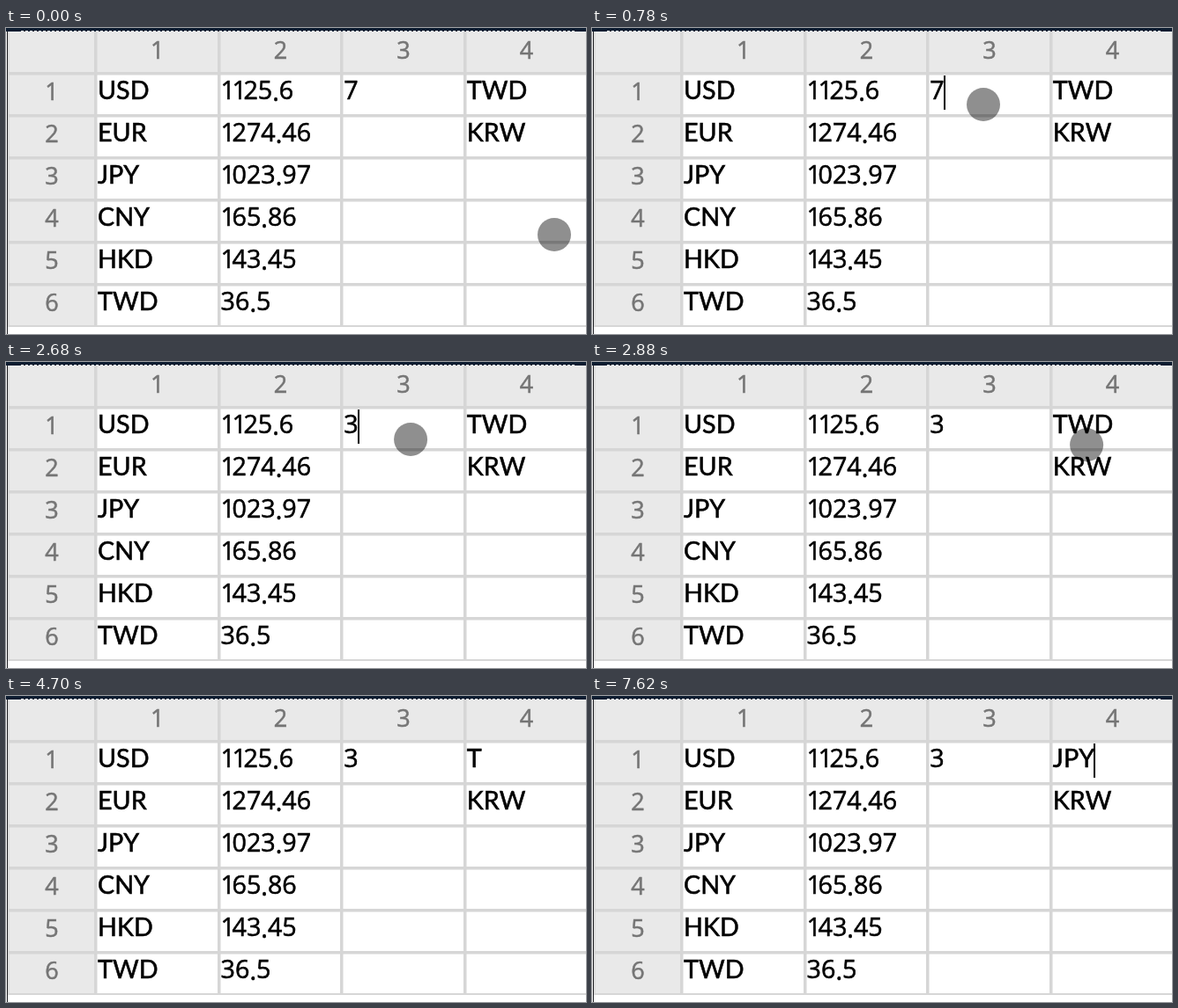
Animation of 658x348 px, one loop 8 s. Source, as an HTML page:

```html
<!DOCTYPE html>
<html lang="en">
<head>
<meta charset="utf-8">
<title>Exchange sheet</title>
<style>
  html, body { margin: 0; width: 100%; height: 100%; overflow: hidden; background: #fff; }
  svg { display: block; width: 658px; height: 348px; }
  text { font-size: 28.7px; font-kerning: none; fill: #000; stroke: #000; stroke-width: .55px; }
  .word { font-family: Lato, "Open Sans", sans-serif; }
  .num { font-family: "Open Sans", "Noto Sans", sans-serif; }
  .head { font-size: 27px; fill: #757575; stroke: #757575; text-anchor: middle; }
</style>
</head>
<body>
<svg id="stage" viewBox="0 0 658 348"></svg>
<script>
const LOOP = 8000, ROW = 48, COL = 139.6, LEFT = 104;
const stage = document.getElementById('stage');

function add(tag, attrs, content = '') {
  const el = document.createElementNS('http://www.w3.org/2000/svg', tag);
  for (const key in attrs) el.setAttribute(key, attrs[key]);
  el.textContent = content;
  stage.append(el);
  return el;
}
const rect = (x, y, width, height, fill) => add('rect', { x, y, width, height, fill });

function cell(col, row, value) {
  const isNum = /^\d/.test(value);
  const attrs = { x: LEFT + COL * col, y: 81 + ROW * row, class: isNum ? 'num' : 'word' };
  if (isNum) {
    // Narrow 1 and a low decimal point
    const chars = [...value];
    attrs.dx = chars.map((c, i) => chars[i - 1] === '1' ? -3.5 : 0).join(' ');
    attrs.dy = chars.map((c, i) => c === '.' ? 2 : chars[i - 1] === '.' ? -2 : 0).join(' ');
  }
  return add('text', attrs, value);
}

// Grid
rect(2, 4, 656, 48, '#e9e9e9');
rect(2, 4, 100, 336, '#e9e9e9');
for (let i = 0; i < 4; i++) rect(Math.round(100 + COL * i), 4, 3.5, 336, '#d6d6d6');
for (let i = 0; i < 7; i++) rect(2, 50 + ROW * i, 656, i < 6 ? 3.5 : 2, '#d6d6d6');
rect(2, 4, 1.5, 336, '#d6d6d6');
rect(1, 0, 1, 348, '#1b1b1f');
rect(0, 0, 658, 4, '#0c1c30');
add('path', { d: 'M17 3.5H645', stroke: '#e9e9e9', 'stroke-dasharray': '3 2' });

// Labels and values
for (let i = 0; i < 4; i++) add('text', { x: 171.8 + COL * i, y: 34.5, class: 'num head' }, i + 1);
for (let i = 0; i < 6; i++) add('text', { x: 52, y: 82 + ROW * i, class: 'num head' }, i + 1);
[['USD', '1125.6'], ['EUR', '1274.46'], ['JPY', '1023.97'],
 ['CNY', '165.86'], ['HKD', '143.45'], ['TWD', '36.5']].forEach(([code, rate], row) => {
  cell(0, row, code);
  cell(1, row, rate);
});
cell(3, 1, 'KRW');
const amount = cell(2, 0, '7');
const currency = cell(3, 0, 'TWD');
const caret = rect(0, 54, 2, 39, '#000');
const pointer = add('circle', { r: 19, fill: '#000' });

// Edits: time and resulting text
const amounts = { 0: '7', 1840: '', 2220: '3' };
const currencies = { 0: 'TWD', 4560: 'TW', 4700: 'T', 4860: '', 6220: 'J', 7400: 'JP', 7620: 'JPY' };
const textAt = (edits, t) => edits[Object.keys(edits).findLast(time => time <= t)];

// The caret shows for one blink after each of these times
const BLINK = 540;
const blinks = [740, 1800, 2220, 4100, 5300, 6220, 7320, 7620];

// Pointer moves: start, duration, dx, dy
const moves = [[20, 320, -170, -173], [500, 200, -8, 25], [2600, 430, 162, 10],
  [3060, 320, -46, -4], [3600, 40, 3, 1]];

const ramp = (t, start, length) => Math.min(1, Math.max(0, (t - start) / length));
const ease = k => k * k * (3 - 2 * k);

function draw(t) {
  amount.textContent = textAt(amounts, t);
  currency.textContent = textAt(currencies, t);

  const field = t < 4000 ? amount : currency;
  const end = field.textContent ? field.getComputedTextLength() : 0;
  const shown = blinks.some(b => t >= b && t < b + BLINK);
  caret.setAttribute('x', Math.round(+field.getAttribute('x') + end - 1));
  caret.setAttribute('visibility', shown ? 'visible' : 'hidden');

  let x = 622, y = 235;
  for (const [start, length, dx, dy] of moves) {
    const k = ease(ramp(t, start, length));
    x += dx * k;
    y += dy * k;
  }
  const alpha = 1 - ramp(t, 1180, 140) + ramp(t, 2600, 80) - ramp(t, 4480, 140);
  pointer.setAttribute('cx', x);
  pointer.setAttribute('cy', y);
  pointer.setAttribute('opacity', 0.44 * alpha);
}

const start = performance.now();
function tick() {
  draw((performance.now() - start) % LOOP);
  requestAnimationFrame(tick);
}
draw(0);
requestAnimationFrame(tick);
</script>
</body>
</html>
```
